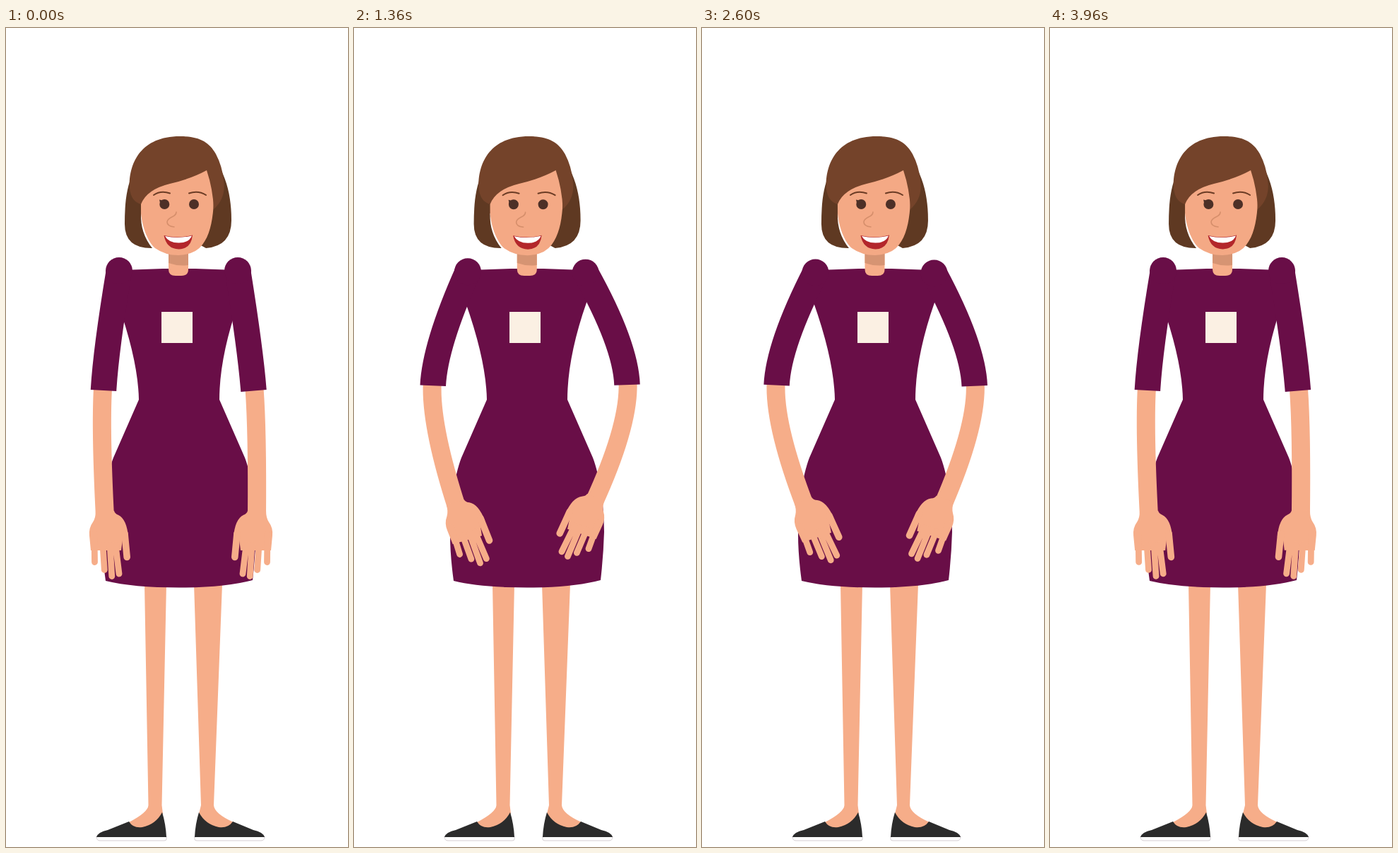
An HTML page for the animation above (4000 ms loop, 484 px wide and 1157 px high).

```html
<!DOCTYPE html>
<html lang="en">
<head>
<meta charset="utf-8">
<title>Standing woman</title>
<style>
  html, body { margin: 0; width: 100%; height: 100%; overflow: hidden; background: #fff; }
  svg { display: block; width: 484px; height: 1157px; }
  .skin { fill: #f6ad89; }
  .dress { fill: #690e47; }
  .hair { fill: #74432a; }
  .back { fill: #5f3922; }
  .shoe { fill: #2b2b2b; }
  .sole { fill: #fff; stroke: #d4ced2; }
  .line { fill: none; stroke-linecap: round; }
  .sleeve { fill: none; stroke: #690e47; stroke-width: 36.5; }
  .forearm { fill: none; stroke: #f6ad89; stroke-width: 26; }
</style>
</head>
<body>
<svg viewBox="0 0 484 1157">
  <defs>
    <g id="hand">
      <path class="skin" d="M-13-8Q-13 2-17 8Q-23 16-22 27L-20 48H23L25 32L33 29Q31 4 19-2Q14-4 13-8Z"/>
      <g class="line" stroke="#f6ad89" stroke-width="8.8">
        <path d="M-15 25L-14.5 64.5M-3 40L-.7 75.5M7 40L9.8 84.5M15 40L20 81"/>
        <path d="M28 24L31.2 57.5" stroke-width="9.6"/>
      </g>
    </g>
  </defs>

  <path class="skin" d="M196 785L201.500 1098Q201 1108 174 1122Q192 1150 222 1110L220.500 1098L227 785Z"/>
  <path class="skin" d="M266 785L276 1098L273 1110Q303 1150 322 1122Q295 1110 294 1098L306 785Z"/>
  <path class="sole" d="M128 1142H227V1146Q227 1148 224 1148H133Q128 1148 128 1142Z"/>
  <path class="sole" d="M366 1142H267V1146Q267 1148 270 1148H361Q366 1148 366 1142Z"/>
  <path class="shoe" d="M128 1143Q130 1136 144 1133L174 1121Q180 1131 193 1129Q212 1125 221 1108Q226 1124 227 1143Z"/>
  <path class="shoe" d="M366 1143Q364 1136 350 1133L321 1121Q314 1131 301 1129Q282 1125 273 1108Q268 1124 267 1143Z"/>

  <path class="dress" d="M165 342L222 340H268L325 342L336 350L329 388Q302 465 302 525L338 607C348 633 354 675 354 712Q353 745 349 780Q310 790.500 245 790.500Q180 790.500 141 781Q136 745 136 715C136 675 142 633 152 607L188 525Q187 470 158 388L154 350Z"/>
  <rect x="220" y="401" width="44" height="44" fill="#fbf0e3"/>

  <g id="left"></g>
  <g id="right"></g>

  <g id="neck">
    <path class="skin" d="M230 308H258V341Q258 350 248 350H240Q230 350 230 341Z"/>
    <path d="M230 310H258V335Q244 337 230 332Z" fill="#d69473"/>
  </g>

  <g id="head">
    <path class="back" d="M180 205C170 225 168 250 168 277Q168 312 208 311L245 290L283 311Q319 308 319 272C319 245 315 222 304 200Z"/>
    <path d="M191 262Q190 290 207 311L215 311L200 262Z" fill="#fff"/>
    <g id="face">
      <path fill="#f4a985" d="M191 215V262C193 283 201 302 211 311Q225 321 244 321Q268 320 278 306C289 292 293 270 294 245Q292 220 284 190Z"/>
      <g fill="#4d3027">
        <circle cx="224.300" cy="249" r="7"/>
        <circle cx="266" cy="249" r="7"/>
        <path d="M217 242.500L221 243.500L218 247Z"/>
      </g>
      <g class="line" stroke="#6b3c25" stroke-width="2">
        <path d="M209 236Q219 229 232 233.500"/>
        <path d="M259 233.500Q272 229 283 236"/>
      </g>
      <path class="line" stroke="#d58e6b" stroke-width="1.600" d="M241 260C241 268 229 266 228 274Q228 280 238 281"/>
      <path fill="#b3262b" d="M223.500 293Q244 298 264 292.500Q262 312 244.500 312.500Q227 312 223.500 293Z"/>
      <path fill="#fff" d="M225 294Q244 298 263 293.500Q259 303.500 244.500 303.500Q230 303.500 225 294Z"/>
    </g>
    <path class="hair" d="M175 227C173 195 188 153 246 153C272 153 287 160 297 178Q306 195 308 215Q312 240 294 256Q293 228 284 201Q262 213 232 220Q199 228 191 249Q177 245 175 227Z"/>
  </g>
</svg>

<script>
const LOOP = 4000, STEP = 40;

// Each pose: shoulder x y, elbow x y, wrist x y, hand turn
const leftArm = {
  side: 1, peak: 2060,
  rest: [160, 343, 138, 512, 140, 690, 0],
  open: [162.5, 340.5, 130, 507, 145, 685, 8.5],
  wide: [159.5, 348, 93.5, 503.5, 146, 670, 24]
};
const rightArm = {
  side: -1, peak: 1900,
  rest: [328, 343, 350.5, 512.5, 355, 690, 0],
  open: [331, 349, 383.5, 510.5, 347, 680, 17],
  wide: [326, 344, 388, 501, 336, 665, 20.5]
};

const $ = id => document.getElementById(id);

function ease(x) {
  const u = Math.min(1, Math.max(0, x));
  return u * u * (3 - 2 * u);
}

// Leaves the resting pose at the start of the loop, returns at its end
const away = t => ease(Math.min(t, LOOP - t) / 600);
// Swells to 1 at the peak and fades within the reach
const swell = (t, peak, reach) => ease(1 - Math.abs(t - peak) / reach);

function makeArm(id, { side, peak, rest, open, wide }) {
  $(id).innerHTML = '<path class="forearm"/><path class="sleeve"/>' +
    '<circle class="dress" r="19"/><use href="#hand"/>';
  const [forearm, sleeve, puff, hand] = $(id).children;
  return t => {
    const a = away(t), s = swell(t, peak, 1400);
    const [sx, sy, ex, ey, wx, wy, turn] = rest.map((r, i) =>
      r + a * (open[i] - r) + s * (wide[i] - open[i]));
    const bend = 57 / Math.hypot(wx - sx, wy - sy);
    const bx = (wx - sx) * bend, by = (wy - sy) * bend, fx = ex - side;
    sleeve.setAttribute('d', `M${sx} ${sy}Q${ex - bx} ${ey - by} ${ex} ${ey}`);
    forearm.setAttribute('d', `M${fx} ${ey - 3}Q${fx + bx} ${ey + by} ${wx} ${wy}`);
    puff.setAttribute('cx', sx);
    puff.setAttribute('cy', sy);
    hand.setAttribute('transform',
      `translate(${wx} ${wy}) rotate(${-side * turn}) scale(${side} 1)`);
  };
}

const arms = [makeArm('left', leftArm), makeArm('right', rightArm)];

function draw(now) {
  const t = Math.floor((now % LOOP) / STEP) * STEP;
  arms.forEach(pose => pose(t));
  const sway = 5 * away(t) - 11.5 * swell(t, 2000, 1000);
  const nod = swell(t, 1900, 600);
  $('neck').setAttribute('transform', `translate(${sway / 2} 0)`);
  $('head').setAttribute('transform', `translate(${sway} ${2 * nod})`);
  $('face').setAttribute('transform', `translate(0 ${6 * nod}) rotate(${-2 * nod} 244 260)`);
}

const start = performance.now();
function tick() {
  draw(performance.now() - start);
  requestAnimationFrame(tick);
}
tick();
</script>
</body>
</html>
```
